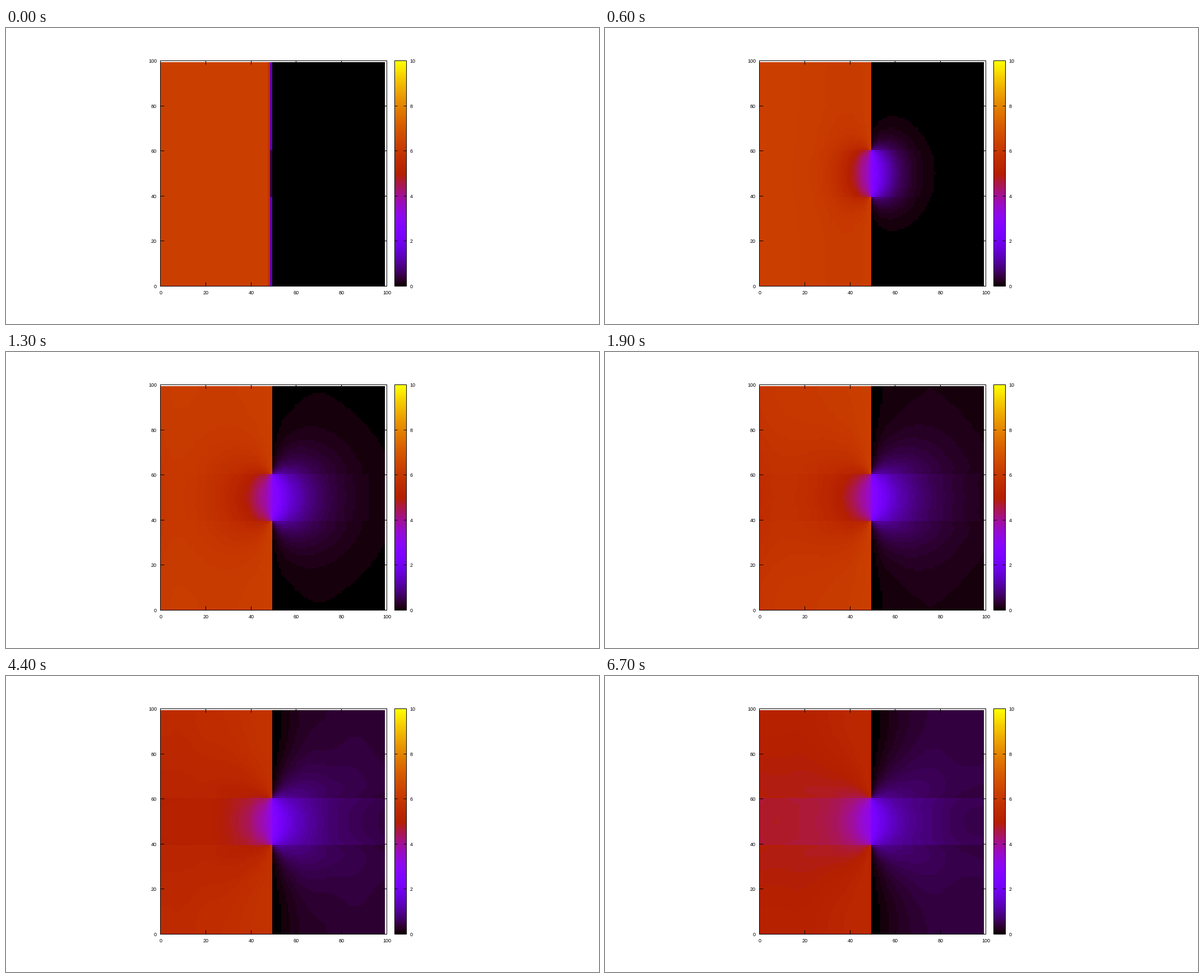
A matplotlib script for the animation above (7 s loop, 1058 px wide and 529 px high).

```python
import numpy as np
import matplotlib.pyplot as plt
from matplotlib.animation import FuncAnimation
from matplotlib.patches import Rectangle

# Rarefied gas leaking through a slit, on a grid of discrete velocities.
# Columns 0-99 hold right movers, 100-149 left movers of x = 49..0.
# Rows 0-49 hold up movers of y = 50..99, rows 50-99 down movers of y = 99..50.
W, H = 1058, 529
FRAMES, INTERVAL = 70, 100
DV, VMAX2 = 0.25, 9.3
SUB, DT = 10, 0.2
EPS = 1e-9            # keeps float32 away from denormals
SLIT = 11             # open rows above and including the middle one

height = np.minimum(np.arange(100), 99 - np.arange(100))
wall = height >= SLIT


def fold(a):
    return a[..., :50] + a[..., :49:-1]


def unfold(a):
    return np.concatenate([a, a[::-1]])


class Beam:
    """All gas with one horizontal speed."""

    def __init__(self, vx):
        vy = np.arange(0, 3.01, DV)
        vy = vy[vx ** 2 + vy ** 2 <= VMAX2]
        m = len(vy)
        self.vx = float(vx)
        self.w = (DV ** 2 * np.exp(-(vx ** 2 + vy ** 2) / 2)).astype(np.float32)
        self.w[0] /= 2
        self.cy = np.tile(vy * DT, (99, 1)).astype(np.float32)
        self.g = np.full((150, 100, m), EPS, np.float32)
        self.g[:49] = 1
        self.g[101:] = 1
        self.dx = np.empty((149, 100, m), np.float32)
        self.dy = np.empty((150, 99, m), np.float32)

    def step(self):
        g, dx, dy = self.g, self.dx, self.dy
        np.subtract(g[1:], g[:-1], out=dx)
        dx[49, wall] = g[50, wall] - EPS
        dx[99] = g[100] - EPS
        dx *= self.vx * DT
        g[1:] -= dx
        first = (g[:, 0] - g[:, 98]) * self.cy[0]
        np.subtract(g[:, 1:], g[:, :-1], out=dy)
        dy *= self.cy
        g[:, 1:] -= dy
        g[:, 0] -= first

    def flux(self, col):
        return fold(self.g[col] @ self.w) * self.vx


def simulate():
    beams = [Beam(v) for v in np.arange(1, 13) * DV]
    unit = sum(2 * b.vx * b.w.sum() for b in beams)
    vy = np.arange(0, 3.01, DV)
    w0 = DV ** 2 * np.exp(-vy ** 2 / 2)
    w0[0] /= 2
    still = np.zeros((100, len(vy)))      # vx = 0 next to the wall

    def advance():
        for b in beams:
            b.step()
        hit = unfold(sum(b.flux(49) for b in beams) / unit)
        edge = unfold(sum(b.flux(149) for b in beams) / unit)
        for b in beams:
            b.g[100, wall] = hit[wall, None]
            b.g[0] = edge[:, None]
        prev = np.vstack([still[98], still[:-1]])
        still[:] += DT * vy * (prev - still)
        still[wall] = hit[wall, None]

    def density():
        rho = np.zeros((100, 50))
        for b in beams:
            q = fold(b.g @ b.w)
            rho += q[:100]
            rho[:50] += q[:99:-1]
        rho[:49] += 2 * w0.sum()
        rho[49] += fold(still @ w0)
        rows = np.minimum(np.abs(np.arange(100) - 50), 49)
        return rho[:, rows].T

    advance()
    out = [density()]
    for _ in range(FRAMES - 1):
        for _ in range(SUB):
            advance()
        out.append(density())
    return out


def palette(level):
    x = np.clip(level, 0, 127) / 127
    return np.stack([np.sqrt(x), x ** 3,
                     np.clip(np.sin(2 * np.pi * x), 0, 1)], axis=-1)


# Pixel areas of the map and the colour bar
L, R, T, B = 275.5, 679.5, 58.5, 461.5
BL, BR = 693.5, 714.5
X0, X1, Y0, Y1 = 276, 676, 61, 462
cols = ((np.arange(X0, X1) + 0.9 - X0) / 4.02 + 0.5).astype(int)
rows = ((Y1 - np.arange(Y0, Y1) - 0.9) / 4.03 + 0.5).astype(int)

stage = np.ones((H, W, 3))
bar = np.floor((461.5 - np.arange(59, 462)) / 403 * 128)
stage[59:462, 694:714] = palette(bar)[:, None]


def paint(rho):
    rgb = palette(np.floor(rho * 12.8 + 0.5))
    stage[Y0:Y1, X0:X1] = rgb[rows[:, None], cols]
    return stage


fields = simulate()

fig = plt.figure(figsize=(W / 100, H / 100), dpi=100, facecolor="white")
ax = fig.add_axes([0, 0, 1, 1])
ax.axis("off")
img = ax.imshow(paint(fields[0]), interpolation="nearest", aspect="auto",
                extent=(0, W, H, 0))


def line(x0, y0, x1, y1):
    ax.plot([x0, x1], [y0, y1], color="black", lw=0.72, zorder=3,
            snap=False, solid_capstyle="butt")


def box(x0, x1):
    ax.add_patch(Rectangle((x0, T), x1 - x0, B - T, fill=False,
                           ec="black", lw=0.72, zorder=3, snap=False))


def label(x, y, s, ha):
    ax.text(x, y + 3.1, str(s), ha=ha, va="baseline", fontsize=6.5,
            family="Liberation Sans", color="black")


box(L, R)
box(BL, BR)
for v in range(0, 101, 20):
    x = round(L + v * (R - L) / 100 - 0.5) + 0.5
    y = round(B - v * (B - T) / 100 - 0.5) + 0.5
    line(x, B, x, B - 7)
    line(x, T, x, T + 7)
    line(L, y, L + 7, y)
    line(R, y, R - 7, y)
    line(BL, y, BL + 5, y)
    line(BR, y, BR - 5, y)
    label(x + 0.5, 473, v, "center")
    label(269, y, v, "right")
    label(720.5, y, v // 10, "left")
ax.set_xlim(0, W)
ax.set_ylim(H, 0)


def update(i):
    img.set_data(paint(fields[i]))
    return [img]


anim = FuncAnimation(fig, update, frames=FRAMES, interval=INTERVAL,
                     repeat=True, repeat_delay=0)
plt.show()
```
